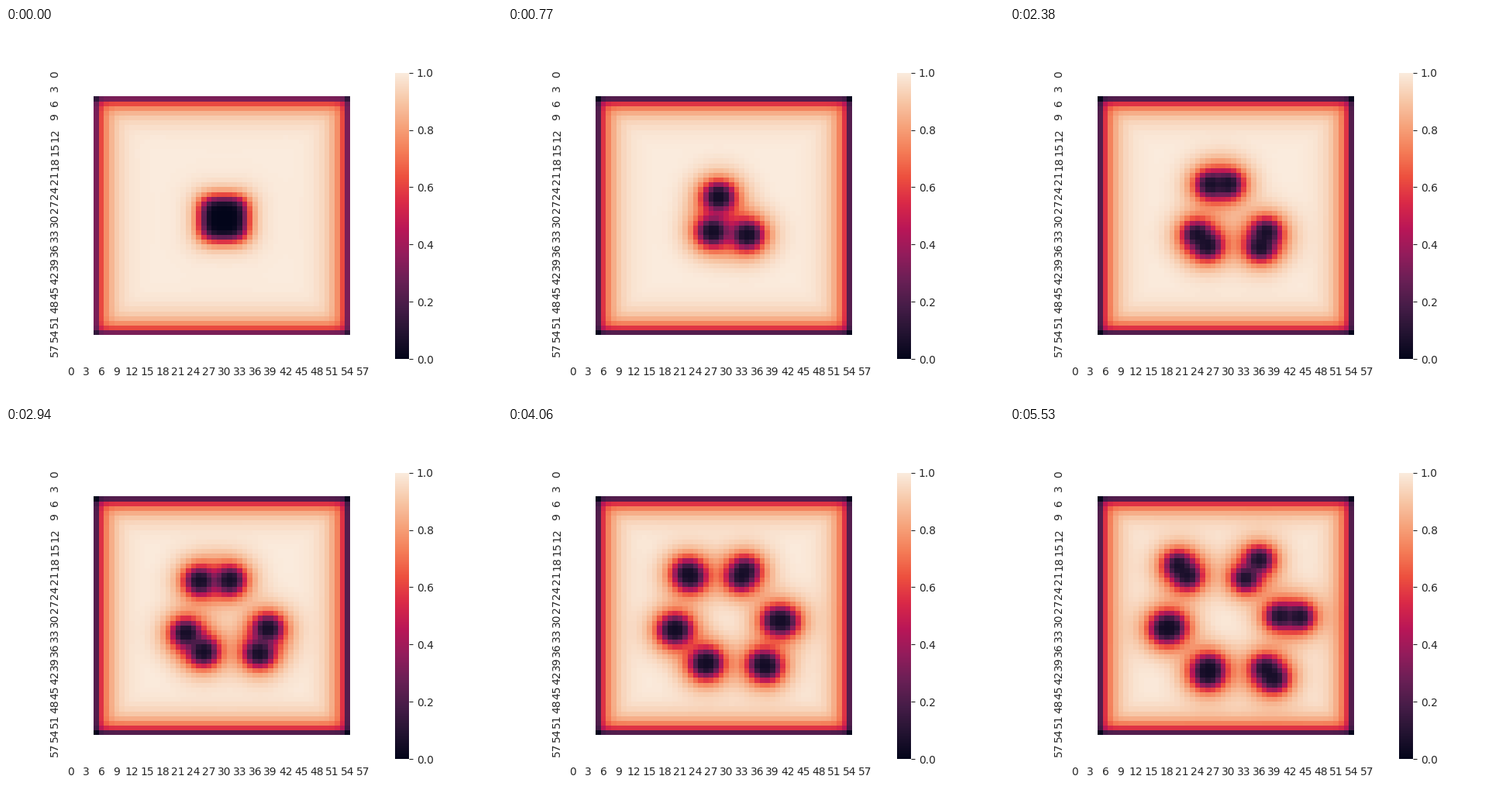
A matplotlib script for the animation above (5.6 s loop, 640 by 480 pixels).

```python
import numpy as np
import matplotlib.pyplot as plt
from matplotlib.animation import FuncAnimation
from matplotlib.colors import LinearSegmentedColormap

FRAMES, STEP, BREAKUP = 80, 70, 11
GRID, PAD = 60, 5
INK = "#262626"
ORIGIN = np.array([80.0, 57.6])
CELL = np.array([396.8, 369.6]) / GRID

plt.rcParams.update({
    "font.family": "DejaVu Sans", "font.size": 10,
    "text.color": INK, "xtick.color": INK, "ytick.color": INK,
})

SHADES = ["#03051a", "#231331", "#451c47", "#691f55", "#921c5b", "#b91657",
          "#d92847", "#ed503e", "#f47d57", "#f6a47c", "#f7c9aa", "#faebdd"]
cmap = LinearSegmentedColormap.from_list("embers", SHADES)
cmap.set_bad("white")

# Three parent spots in stage pixels: start, end, half-gap between children.
PARENTS = np.array([
    [(272, 218), (268, 183), (45, -1)],
    [(264, 263), (230, 286), (26, 28)],
    [(309, 267), (348, 280), (13, -37)],
])
PIVOT = np.array([270, 240])
SPLIT_AXIS = np.array([1, -1]) / np.sqrt(2)

cells = np.arange(PAD, GRID - PAD) + 0.5
col, row = np.meshgrid(cells, cells)


def smooth(t):
    t = np.clip(t, 0, 1)
    return t * t * (3 - 2 * t)


def offsets(point):
    """Distance of every cell from a stage pixel, in cells."""
    x, y = (point - ORIGIN) / CELL
    return col - x, row - y


def wall(frame):
    """Dip of the field towards the four edges."""
    n = len(cells)
    k = np.minimum(np.arange(n), np.arange(n)[::-1])
    young = np.exp(-frame / 3)
    inner = (0.43 - 0.05 * young) * np.exp(-(k - 1) / 2)
    depth = np.where(k == 0, 0.78 - 0.09 * young, inner)
    both = (depth[:, None] ** 3 + depth[None, :] ** 3) ** (1 / 3)
    return np.clip(1 - both, 0, 1)


def seed_block():
    dx, dy = np.abs(offsets(np.array([281, 246])))
    rho = (dx ** 3 + dy ** 3) ** (1 / 3)
    return 1 - 1 / (1 + (rho / 4.7) ** 6)


def dip(point):
    r = np.hypot(*offsets(point))
    return 1 - 0.93 * np.exp(-(r / 9) ** 4) / (1 + (r / 2.6) ** 3)


def spots(frame):
    """Parents drift outwards, part into children, which start to split too."""
    t = max(frame - BREAKUP, 0) / (FRAMES - 1 - BREAKUP)
    drift, gap = 1 - (1 - t) ** 1.5, smooth(t)
    late = (frame / (FRAMES - 1)) ** 3
    field = np.ones_like(col)
    for start, end, half in PARENTS:
        middle = start + (end - start) * drift
        for side in (-1, 1):
            child = middle + side * half * gap
            out = (child - PIVOT) / np.hypot(*(child - PIVOT))
            split = out * (9 + 6 * out @ SPLIT_AXIS) * late
            field *= (dip(child - split) * dip(child + split)) ** (0.42 + 0.7 * gap)
    return 0.04 + 0.96 * field


def field_at(frame):
    full = np.full((GRID, GRID), np.nan)
    t = smooth(frame / BREAKUP)
    inner = (1 - t) * seed_block() + t * spots(frame)
    full[PAD:-PAD, PAD:-PAD] = inner * wall(frame)
    return np.ma.masked_invalid(full)


fig = plt.figure(figsize=(6.4, 4.8), dpi=100, facecolor="white")
ax = fig.add_axes([0.125, 0.11, 0.62, 0.77])
mesh = ax.pcolormesh(field_at(0), cmap=cmap, vmin=0, vmax=1)
ax.set(xlim=(0, GRID), ylim=(GRID, 0))
ax.spines[:].set_visible(False)

marks = np.arange(0, GRID, 3)
ax.set_xticks(marks + 0.5, [str(m) for m in marks])
ax.set_yticks(marks + 0.5, [str(m) for m in marks], rotation=90)
ax.tick_params(left=False, bottom=False)

bar_ax = fig.add_axes([0.78375, 0.11, 18.48 / 640, 0.77])
bar = fig.colorbar(mesh, cax=bar_ax, ticks=np.linspace(0, 1, 6))
bar.outline.set_linewidth(0)


def draw(frame):
    mesh.set_array(field_at(frame))
    return (mesh,)


anim = FuncAnimation(fig, draw, frames=FRAMES, interval=STEP,
                     init_func=lambda: draw(0), repeat=True, repeat_delay=0)
plt.show()
```
